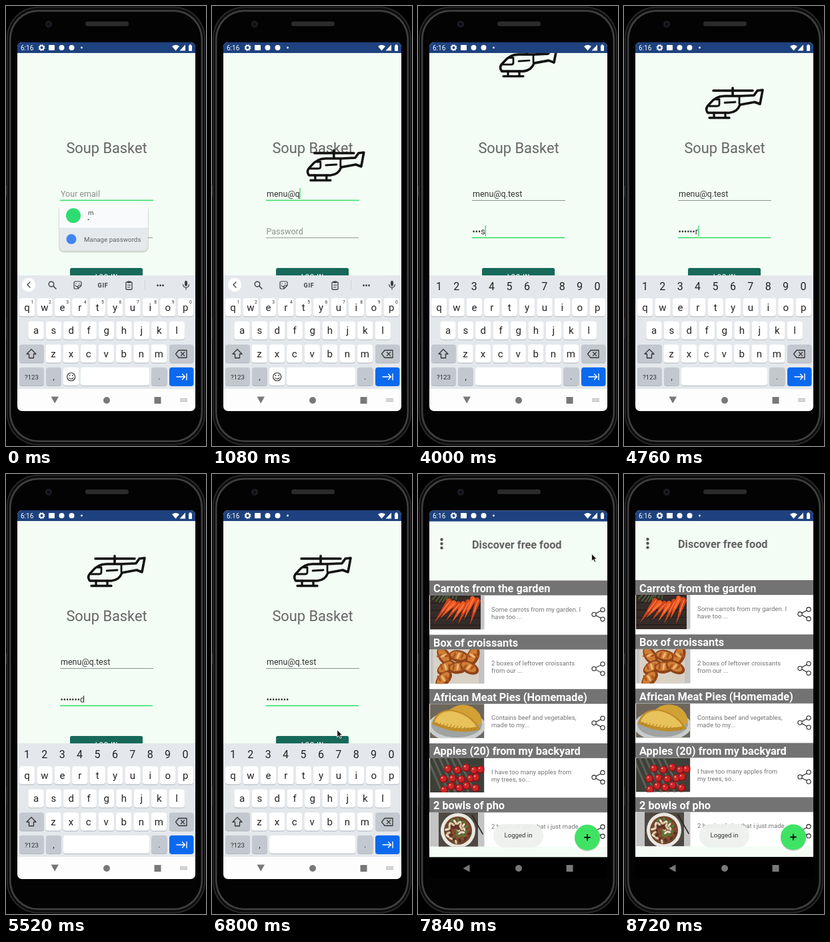
These frames come from a looping animation (300x655 px, 8760 ms). An HTML page:

```html
<!DOCTYPE html>
<html lang="en">
<head>
<meta charset="utf-8">
<title>Login demo</title>
<style>
html, body { margin: 0; height: 100%; overflow: hidden; background: #000; }
svg { display: block; }
#stage { width: 100vw; height: 100vh; }
text { font-family: Roboto, "Noto Sans", sans-serif; white-space: pre; }
.mid { text-anchor: middle; }
.line { fill: none; stroke-linecap: round; stroke-linejoin: round; }
</style>
</head>
<body>
<svg id="stage" viewBox="0 0 300 655"></svg>
<script>
const LOOP = 8760, EMAIL = 'menu@q.test', SECRET = 'password';
const EMAIL_START = 150, EMAIL_STEP = 170;
const FOCUS = 2700, SECRET_START = 3075, SECRET_STEP = 275;
const HIDE = 7100, SLIDE = 7410, SLIDE_TIME = 440, TRAVEL = 549;

const rect = (x, y, w, h, fill, r = 0, more = '') =>
  `<rect x="${x}" y="${y}" width="${w}" height="${h}" rx="${r}" fill="${fill}" ${more}/>`;
const circle = (x, y, r, fill, more = '') =>
  `<circle cx="${x}" cy="${y}" r="${r}" fill="${fill}" ${more}/>`;
const oval = (x, y, rx, ry, turn, fill) =>
  `<ellipse cx="${x}" cy="${y}" rx="${rx}" ry="${ry}" fill="${fill}" transform="rotate(${turn} ${x} ${y})"/>`;
const text = (x, y, size, fill, s, more = '') =>
  `<text x="${x}" y="${y}" font-size="${size}" fill="${fill}" ${more}>${s}</text>`;
const mid = (x, y, size, fill, s, more = '') => text(x, y, size, fill, s, 'class="mid" ' + more);
const line = (d, color, width = 1.3, more = '') =>
  `<path class="line" d="${d}" stroke="${color}" stroke-width="${width}" ${more}/>`;
const shape = (d, fill, more = '') => `<path d="${d}" fill="${fill}" ${more}/>`;
const group = (id, body, more = '') => `<g id="${id}" ${more}>${body}</g>`;
const many = (n, f) => Array.from({ length: n }, (_, i) => f(i)).join('');

// Phone
const phone =
  rect(0, 267, 3, 17, '#222', 1) + rect(0, 465, 3, 30, '#161616', 1) +
  rect(1, 1, 298, 653, '#2c2c2e', 47) + rect(2.5, 2.5, 295, 650, '#0d0d0e', 46) +
  rect(5, 6, 290, 643, '#404043', 43) + rect(7.5, 8.5, 285, 638, '#030303', 41) +
  rect(119, 23, 65, 7, '#2b2b2c', 3.5) +
  circle(64, 27, 5, '#1d1e22') + circle(64, 27, 2.5, '#0b0d18');

// Login window
const button = (y, label) =>
  rect(96, y + 1, 109, 24.5, '#0003', 2.5) + rect(96, y, 109, 24, '#17695a', 2.5) +
  mid(151, y + 15.5, 9.3, '#fff', label, 'font-weight="500" letter-spacing=".85"');

const heli = group('heli',
  line('M134 126H193M163 122V133', '#111', 3.6) +
  line('M125 158Q121 152 128 146Q137 134 151 134H174L195 133L200 126L208 125L204 146L196 143L174 147Q170 158 158 159H126Z', '#111', 3.6) +
  line('M137 139H143V146Q143 149 140 149H127M151 144L167 143M173 136V146', '#111', 2.8) +
  line('M135 159V166M152 159V166M128 166.5H158', '#111', 3.3));

const popup = group('popup',
  rect(79, 296, 135, 71, '#0002', 8) + rect(80, 295, 133, 69, '#e6e9eb', 7) +
  shape('M80 330V302Q80 295 87 295H206Q213 295 213 302V330Z', '#f9fafb') +
  circle(101, 312, 11, '#2fdc72') +
  text(123, 311, 9.7, '#444', EMAIL[0]) + text(122, 321, 9, '#444', '•') +
  circle(98, 347, 7.5, '#4285f4') +
  text(117, 351, 9.8, '#5f6368', 'Manage passwords'));

const login = group('login',
  rect(17, 54, 267, 516, '#f3fdf5') + rect(17, 570, 267, 33, '#000') +
  mid(151, 219, 21.8, '#666', 'Soup Basket') +
  '<rect id="line1" x="81" width="140"/><rect id="line2" x="81" width="139"/>' +
  text(82, 284, 12.5, '#333', '', 'id="email"') + text(81.5, 340, 12.5, '#333', '', 'id="secret"') +
  rect(0, 0, 1.3, 16, '#35d865', 0, 'id="caret"') +
  button(390, 'LOG IN') + button(441, 'SIGN UP') + heli + popup +
  rect(17, 54, 267, 16, '#1e427f'));

// Keyboard
const key = (x, y, w, fill = '#fff', h = 27) =>
  rect(x, y + 1, w, h, '#b3b8bf', 4) + rect(x, y, w, h, fill, 4);
const letters = (row, x, y) => [...row].map((c, i) =>
  key(x + i * 26.4 - 11.7, y, 23.4) + mid(x + i * 26.4, y + 18.5, 15, '#222', c)).join('');
const GREY = '#c3c8d0', INK = '#3c4043';

const tools = group('tools',
  circle(34, 415, 10.3, '#fff') + line('M36 411L32 415L36 419', INK) +
  circle(68, 414, 3.8, 'none', `stroke="${INK}" stroke-width="1.4"`) + line('M71 417L75 421', INK, 1.6) +
  line('M104 410H111Q113 410 113 412V416L108 421H104Q102 421 102 419V412Q102 410 104 410ZM108 421V417Q108 416 109 416H113M104 416Q106 419 108 417M105 413V413.5M110 413V413.5', INK, 1.2) +
  mid(145.5, 418.5, 9, INK, 'GIF', 'font-weight="700" letter-spacing=".7"') +
  rect(180, 411, 9, 11, 'none', 1, `stroke="${INK}" stroke-width="1.3"`) +
  rect(182, 409.5, 5, 3, INK, 1) + line('M182.5 415.5H187M182.5 418.5H186', INK, 1) +
  rect(208, 408, 1, 15, '#cdd2d7') + many(3, i => circle(227.5 + i * 4, 416, 1.4, INK)) +
  rect(268, 409, 4, 8, INK, 2) + line('M265.5 414.5Q266 419 270 419Q274 419 274.5 414.5M270 419V422', INK, 1.2) +
  many(10, i => text(37.5 + i * 26.4, 442.5, 6.8, '#333', (i + 1) % 10)) +
  key(86, 538, 23.5) + circle(97.7, 552, 6, 'none', 'stroke="#333" stroke-width="1.2"') +
  circle(95.5, 550, .9, '#333') + circle(100, 550, .9, '#333') + line('M94.5 553.5Q97.7 557 101 553.5', '#333', 1.1));

const keyboard = group('keyboard',
  rect(17, 401, 267, 170, '#e4e8ec') + rect(17, 570, 267, 33, '#fdfdfd') +
  letters('qwertyuiop', 31.6, 435) + letters('asdfghjkl', 45, 469.5) + letters('zxcvbnm', 71, 504) +
  key(20, 504, 37, GREY) + line('M38 511L45 518H41.5V524H34.5V518H31Z', '#333', 1.3) +
  key(245, 504, 36.5, GREY) +
  line('M259 512.5H271V523.5H259L254.5 518ZM262.5 515.5L267.5 520.5M267.5 515.5L262.5 520.5', '#333', 1.3) +
  key(20, 538, 37, GREY) + mid(38.5, 555.5, 9.8, '#333', '?123') +
  key(60, 538, 23, GREY) + mid(71.5, 556, 13, '#333', ',') +
  key(218, 538, 23.5, GREY) + mid(229.7, 556, 13, '#333', '.') +
  rect(245, 538, 36.5, 28, '#0b69ee', 4) + line('M256 552H268M264.5 548L268.5 552L264.5 556M271 547.5V556.5', '#fff', 1.4) +
  '<g id="space"></g>' + tools +
  group('digits', many(10, i => mid(31.4 + i * 26.4, 422.5, 16, '#222', (i + 1) % 10))));

// Food list window: flat pictures in an 81 x 51 box
const noise = n => { const v = Math.sin(n * 12.99 + 4.1) * 43758.5; return v - Math.floor(v); };
const carrot = i => {
  const x = 30 + i * 7, y = 3 + noise(i) * 9, tipX = x - 24 + i * 2, tipY = 34 + noise(i + 4) * 13;
  return shape(`M${x - 4} ${y - 1}Q${x} ${y - 5} ${x + 4} ${y + 3}L${tipX} ${tipY}Z`, i % 2 ? '#ef5a22' : '#d2451a') +
    line(`M${x} ${y + 2}L${(x + tipX) / 2} ${(y + tipY) / 2}`, '#fb8750', 1.3);
};
const carrots = rect(0, 0, 76, 51, '#352b29') + many(5, i => rect(0, i * 11, 76, 1, '#221b1a')) +
  many(8, i => line(`M${4 + i * 5} ${2 + noise(i) * 9}l${8 - i} -9`, '#4d6236', 1.8)) + many(7, carrot);
const croissants = rect(5, 0, 68, 51, '#d9d1c5') +
  many(7, i => {
    const x = 19 + i % 3 * 20 + noise(i) * 6, y = 10 + (i / 3 | 0) * 17, turn = noise(i + 3) * 140 - 70;
    return oval(x, y, 15, 9, turn, '#8f4319') + oval(x - 1, y - 1, 12, 6, turn, '#cf7d35') +
      many(3, k => oval(x - 7 + k * 6, y - 1, 1.6, 5, turn + 15, k % 2 ? '#efb878' : '#a9561f'));
  });
const pies = rect(0, 0, 81, 51, '#6d665c') + oval(40, 33, 43, 23, 0, '#c9ccca') + oval(40, 31, 38, 19, 0, '#9fa3a2') +
  shape('M26 12Q42 -4 62 4Q78 12 78 30L60 34Z', '#d2a136') +
  shape('M3 30Q8 8 34 9Q62 14 76 38Q40 48 3 30Z', '#c08d28') + shape('M7 27Q13 10 34 11Q58 16 70 34Q38 41 7 27Z', '#e8c25a') +
  many(12, i => line(`M${9 + i * 5.2} ${31 + i * .8}l2 -3`, '#a8741f', 1));
const apples = rect(0, 0, 81, 51, '#3d4039') + many(6, i => line(`M${i * 9 - 4} 0L${i * 10 + 18} 51`, '#5c6054', 3)) +
  many(15, i => {
    const x = 24 + i % 5 * 12 + noise(i) * 7 - (i / 5 | 0) * 4, y = 13 + (i / 5 | 0) * 14 + noise(i + 7) * 7;
    return circle(x, y, 6, '#8e1217') + circle(x - .5, y - .5, 4.6, '#cf2526') + circle(x - 2, y - 2, 1.2, '#f59b8e');
  });
const pho = rect(13, 0, 59, 51, '#4e4842') + circle(42, 27, 26, '#e9e8e2') + circle(42, 27, 21, '#70462d') +
  many(44, i => {
    const r = Math.sqrt(i) * 2.7;
    return oval(42 + Math.cos(i * 2.4) * r, 27 + Math.sin(i * 2.4) * r, 3.4, 1.7, i * 47,
      ['#d9c6a0', '#577b38', '#5a3024', '#e6dcc4', '#8f4c30'][i % 5]);
  }) + line('M63 4L79 32', '#2c2320', 1.6);

const share = y => line(`M277 ${y - 7}L264 ${y}L277 ${y + 7}`, '#222', 1.1) +
  [[277, -7], [264, 0], [277, 7]].map(([x, d]) => circle(x, y + d, 3.1, '#fff', 'stroke="#222" stroke-width="1.1"')).join('');
const items = [
  ['Carrots from the garden', 'Some carrots from my garden. I', 'have too ...', carrots],
  ['Box of croissants', '2 boxes of leftover croissants', 'from our ...', croissants],
  ['African Meat Pies (Homemade)', 'Contains beef and vegetables,', 'made to my...', pies],
  ['Apples (20) from my backyard', 'I have too many apples from', 'my trees, so...', apples],
  ['2 bowls of pho', '2 bowls of pho that i just made', '', pho]
];
const row = ([name, top, bottom, photo], i) => {
  const y = 158 + i * 80.8;
  return rect(17, y, 267, i < 4 ? 81 : 73, '#fff') + rect(17, y, 267, 22, '#737373') +
    text(23, y + 17.5, 16.3, '#fff', name, 'font-weight="700"') +
    `<svg x="18" y="${y + 22}" width="81.5" height="51">${rect(0, 0, 82, 51, '#c4c4c4') + photo}</svg>` +
    text(110, y + 46, 9.55, '#757575', top) + text(110, y + 57, 9.55, '#757575', bottom) + share(y + 50.5);
};
const list = group('list',
  rect(17, 54, 267, 516, '#f3fdf5') + rect(17, 54, 267, 16, '#1e427f') +
  many(3, i => circle(35.5, 97 + i * 6.2, 2.2, '#555')) +
  text(81, 110, 16.3, '#626262', 'Discover free food', 'font-weight="700"') +
  items.map(row).join('') +
  circle(254, 542, 19, '#0003') + circle(254, 540.5, 19, '#3fe364') +
  line('M250 540.5H258M254 536.5V544.5', '#111', 1.9) +
  rect(17, 570, 267, 33, '#000'));

// System overlay
const status =
  text(22, 66.2, 10, '#fff', '6:16') +
  circle(53.5, 62, 3, 'none', 'stroke="#fff" stroke-width="2"') +
  circle(53.5, 62, 4.3, 'none', 'stroke="#fff" stroke-width="1.2" stroke-dasharray="1.7 1.68"') +
  rect(64, 58, 9, 8, '#fff', 1) + circle(83.5, 62, 4, '#fff') + circle(98.5, 62, 4, '#fff') + circle(113.5, 62, 1.4, '#fff') +
  shape('M249 60Q254.500 56 260 60L254.500 66.500Z', '#fff') + shape('M269 57.500V66.500H260.500Z', '#fff') +
  rect(274, 58.5, 5, 8.5, '#fff', 1) + rect(275.3, 57.3, 2.4, 2, '#fff');
const nav = shape('', '#787878', 'id="back"') + circle(151, 587, 5, '#787878') + rect(222.5, 582, 10, 10, '#787878') +
  group('switcher', many(3, r => many(5, c => rect(261.5 + c * 2.2, 584 + r * 2, 1.3, 1.2, '#888'))));
const toast = group('toast',
  rect(113, 521, 75, 35, '#eef1ef', 17, 'fill-opacity=".94"') + mid(150.5, 541.3, 9.6, '#333', 'Logged in'));
const pointer = group('pointer',
  shape('M0 0V11L2.6 8.700L4.500 12.600L6.400 11.700L4.600 7.900H8Z', '#111', 'stroke="#fff" stroke-width=".9"'));

stage.innerHTML = `<clipPath id="screen">${rect(17, 54, 267, 549, '#fff', 7)}</clipPath>` + phone +
  group('view', login + list + keyboard + status + nav + toast, 'clip-path="url(#screen)"') + pointer;

const el = id => document.getElementById(id);
const clamp = p => Math.max(0, Math.min(1, p));
const ease = p => .5 - .5 * Math.cos(Math.PI * clamp(p));
const move = (id, x, y) => el(id).setAttribute('transform', `translate(${x} ${y})`);
const show = (id, on) => el(id).style.display = on ? '' : 'none';
const typed = (t, start, step, max) => Math.max(0, Math.min(max, Math.floor((t - start) / step) + 1));

function field(id, value, hint) {
  el(id).textContent = value || hint;
  el(id).setAttribute('fill', value ? '#333' : '#8b8f8c');
}
function underline(id, y, active) {
  const n = el(id);
  n.setAttribute('y', active ? y - .5 : y);
  n.setAttribute('height', active ? 1.7 : 1);
  n.setAttribute('fill', active ? '#4be076' : '#8d938f');
}

function drawForm(t) {
  const inSecret = t >= FOCUS;
  const n = typed(t, EMAIL_START, EMAIL_STEP, EMAIL.length);
  const m = typed(t, SECRET_START, SECRET_STEP, SECRET.length);
  const lastKey = inSecret
    ? (m ? SECRET_START + (m - 1) * SECRET_STEP : FOCUS)
    : (n ? EMAIL_START + (n - 1) * EMAIL_STEP : -590);
  const plain = m && t - lastKey < 1500;
  field('email', EMAIL.slice(0, n), 'Your email');
  field('secret', plain ? '•'.repeat(m - 1) + SECRET[m - 1] : '•'.repeat(m), 'Password');
  underline('line1', 289, !inSecret);
  underline('line2', 344.5, inSecret);
  const filled = inSecret ? m : n;
  const width = filled ? el(inSecret ? 'secret' : 'email').getComputedTextLength() : 0;
  move('caret', 81.5 + width, inSecret ? 327 : 271);
  show('caret', (t - lastKey) % 1000 < 500);
  show('popup', !n);
}

function drawHeli(t) {
  if (t < 2440) move('heli', 20 - (t - 1080) * .208, 93);
  else move('heli', 0, Math.min(0, -62 + (t - 4000) * .109));
}

function drawKeyboard(t) {
  const plainMode = t < FOCUS, x = plainMode ? 112 : 86;
  show('tools', plainMode);
  show('digits', !plainMode);
  el('space').innerHTML = key(x, 538, 215 - x);
  move('keyboard', 0, 202 * ease((t - HIDE) / 240));
  const up = t < HIDE + 100;
  el('back').setAttribute('d', up ? 'M67.5 581.500H79L73.200 591.500Z' : 'M77.500 581.500V592.500L67.500 587Z');
  show('switcher', up);
}

function drawPointer(t) {
  const p = t < 7660 ? ease((t - 6120) / 780) : 1 - ease((t - 7660) / 280);
  move('pointer', 290 - 106.5 * p, 12 + 384 * p);
  show('pointer', t >= 6120 && t < 7940);
}

function draw() {
  const t = performance.now() % LOOP;
  const shift = TRAVEL * ease((t - SLIDE) / SLIDE_TIME);
  drawForm(t);
  drawHeli(t);
  drawKeyboard(t);
  drawPointer(t);
  move('login', 0, -shift);
  move('list', 0, TRAVEL - shift);
  el('toast').style.opacity = clamp((t - 7420) / 150);
  requestAnimationFrame(draw);
}
draw();
</script>
</body>
</html>
```
